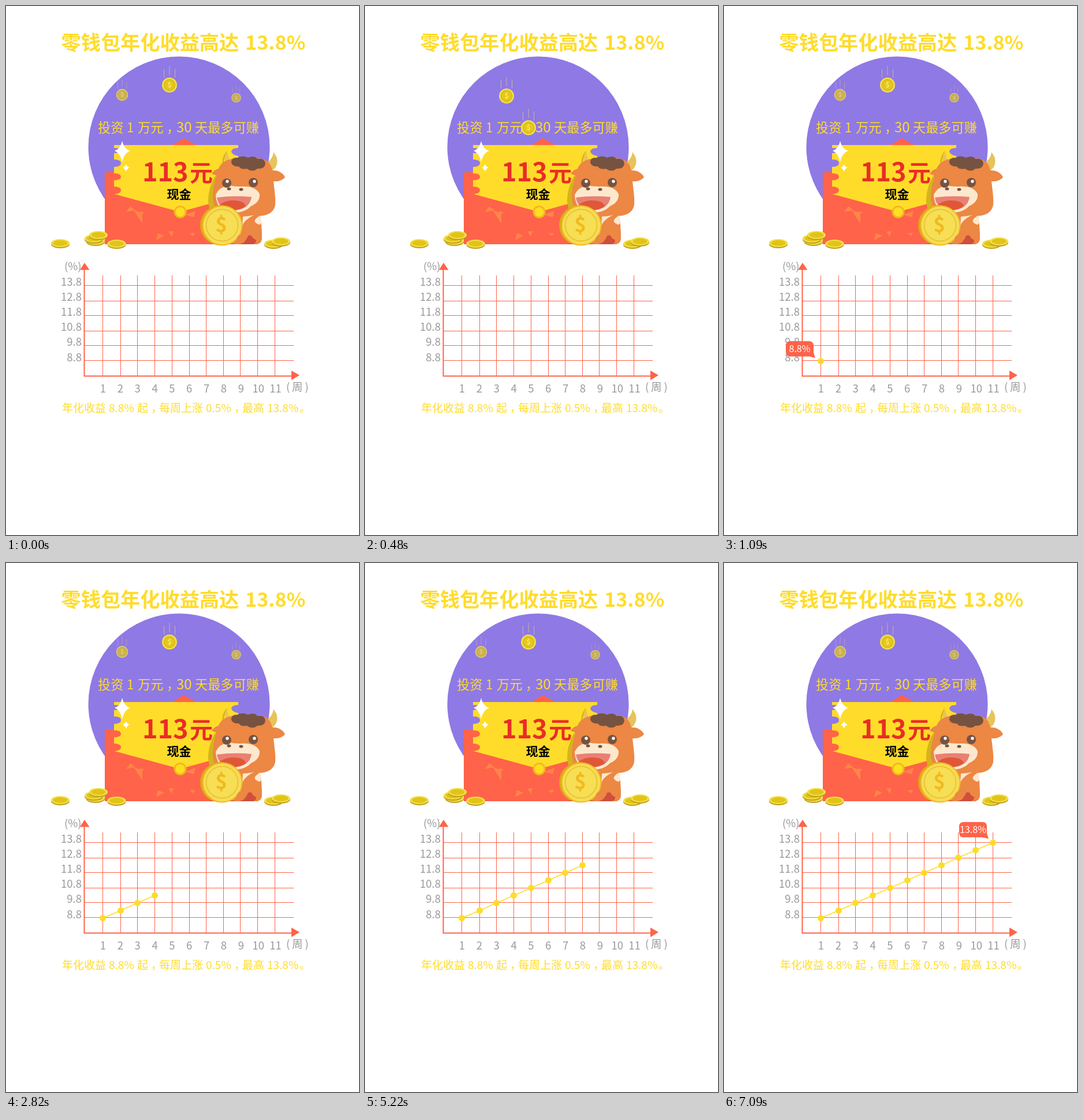
Write an HTML page that moves like this. It is 611x917 px and loops after 7.56 s.

```html
<!DOCTYPE html>
<html lang="zh-CN">
<head>
<meta charset="utf-8">
<title>年化收益</title>
<style>
  html, body { margin: 0; width: 100%; height: 100%; overflow: hidden; background: #fff; }
  svg { display: block; width: 611px; height: 917px; }
  text { font-family: "Noto Sans CJK SC", "Noto Sans CJK", "Open Sans", sans-serif; white-space: pre; }
  .bold { font-weight: 700; }
  .gold { fill: #ffdc2a; }
  .red { fill: #ff6349; }
  .grid { stroke: #ff6349; fill: none; }
  .label { fill: #999; font-size: 18.5px; }
  .mid { text-anchor: middle; }
  .end { text-anchor: end; }
  .tip { fill: #fff; font-size: 16px; text-anchor: middle; }
</style>
</head>
<body>
<svg viewBox="0 0 611 917" xmlns="http://www.w3.org/2000/svg">
  <defs>
    <g id="coin">
      <circle r="13" fill="#f1e04a"/>
      <circle r="10.4" fill="#dcba16"/>
      <circle r="8.6" fill="#e5c71d"/>
      <text class="mid bold" y="4.3" font-size="12" fill="#f7ec70">$</text>
      <path d="M-9.5-28V-13M0-33V-17M9.5-28V-13" stroke="#d9c98c" stroke-opacity=".75" fill="none"/>
    </g>
    <g id="flat">
      <ellipse cy="2" rx="16" ry="7" fill="#c19d16"/>
      <ellipse rx="16" ry="7" fill="#f2df4c"/>
      <ellipse rx="12.5" ry="5" fill="#e2c417"/>
    </g>
  </defs>

  <g class="gold bold">
    <text x="95.5" y="76" font-size="34.2">零钱包年化收益高达</text>
    <text x="414" y="76" font-size="34.2">13.8%</text>
  </g>

  <circle cx="299.5" cy="244.5" r="157" fill="#8f79e5"/>

  <!-- envelope -->
  <path class="red" d="M286 242L308 229L331 242ZM171 291Q171 288 174 288H436V413H171Z"/>
  <path fill="#ffdc2a" d="M187 241H402V246Q391 246 390 252Q391 258 402 260V340H370L301 357L187 326
    Q199 326 199 319.5Q199 313 187 313V302Q199 302 199 296Q199 290 187 290V279
    Q199 279 199 272.5Q199 266 187 266V255Q199 255 199 249Q199 246 187 246Z"/>
  <path class="red" d="M187 326L301 357L370 338V413H187Z"/>
  <path fill="#ff8549" d="M208 357L215 347L224 354ZM221 354L236 359V377ZM232 356L241 358L233 361Z
    M260 406L263 394L274 398ZM281 391L290 390L287 400ZM310 362L328 355L325 366ZM317 394L327 393L324 399Z"/>
  <circle cx="301.5" cy="357" r="11" fill="#f2b91d"/>
  <circle cx="301.5" cy="357" r="8" fill="#fbdf20"/>
  <path fill="#fff" d="M201 234Q204 248 215 251Q204 255 201 271Q198 255 188 251Q198 248 201 234Z
    M208 274Q209 279 214 280Q209 282 208 287Q206 282 202 280Q206 279 208 274Z"/>

  <g class="bold">
    <text x="236" y="304" font-size="45" fill="#e92d26">113</text>
    <text x="318" y="304" font-size="40" fill="#e92d26">元</text>
    <text x="278.5" y="333.5" font-size="21" fill="#000">现金</text>
  </g>

  <!-- calf -->
  <g>
    <path fill="#d5b41c" d="M382 251Q372 264 375 278L360 298Q349 320 350 340L354 360L374 350V280Z"/>
    <path fill="#e8c35b" d="M383 251Q376 266 380 281L392 276Q384 265 383 251ZM463 253Q462 266 449 273L457 288Q474 278 468 261Z"/>
    <path fill="#ec8744" d="M368 282C373 268 388 264 404 264H440C455 267 459 276 461 285
      C472 284 481 291 483 297Q476 305 463 304C465 322 467 334 466 345C463 360 450 363 440 364
      Q443 380 443 404Q442 413 432 413H388L362 350Q357 340 358 327Q359 310 365 294L356 291Q360 284 368 282Z"/>
    <path fill="#765340" d="M390 272Q389 262 401 263Q410 258 419 263Q430 258 435 265Q448 263 449 273
      Q448 283 435 282Q427 289 417 282Q406 284 403 278Q393 279 390 272Z"/>
    <path fill="#fde8cd" d="M363 327Q369 314 385 311Q395 313 405 313Q432 311 439 326Q440 340 424 347
      Q412 360 387 358Q364 354 363 327Z"/>
    <path fill="#e98074" d="M365 332Q394 328 425 331Q422 353 393 354Q368 353 365 332Z"/>
    <path fill="#e05737" d="M370 344Q386 333 407 339Q414 342 415 347Q406 354 393 354Q377 353 370 344Z"/>
    <g fill="#765340">
      <circle cx="382" cy="307" r="8"/><circle cx="428" cy="306" r="8"/>
      <ellipse cx="386" cy="317" rx="3.5" ry="2.5"/><ellipse cx="407" cy="318" rx="3.5" ry="2.5"/>
    </g>
    <g fill="#fff"><circle cx="383" cy="304" r="2.7"/><circle cx="430" cy="304" r="2.7"/></g>
    <path fill="#fde8cd" d="M440 363Q425 372 434 377Q441 382 442 374ZM410 365Q424 364 430 362Q410 372 409 383Z"/>
    <path fill="#cf4e3c" d="M404 413Q415 411 418 399Q425 395 427 402L433 406Q433 413 426 413Z"/>
    <path fill="#cf4e3c" d="M350 413Q375 407 398 413Z"/>
    <circle cx="371" cy="380" r="35" fill="#dda918"/>
    <circle cx="374.5" cy="380.5" r="35" fill="#f1ba20"/>
    <circle cx="374.5" cy="380.5" r="33" fill="#f5dd56"/>
    <circle cx="374" cy="380" r="27.5" fill="#f6de55" stroke="#edbb2a" stroke-width="1.5"/>
    <text class="mid bold" x="372.5" y="392" font-size="35" fill="#f2b91d">$</text>
    <path fill="#ec8744" d="M402 398Q414 391 419 397Q418 407 403 409Q395 406 402 398Z"/>
  </g>

  <use href="#flat" x="94" y="411"/>
  <use href="#flat" x="155" y="407"/>
  <use href="#flat" x="152" y="403"/>
  <use href="#flat" x="160" y="397"/>
  <use href="#flat" x="191.5" y="412"/>
  <use href="#flat" x="463" y="412"/>
  <use href="#flat" x="476" y="408"/>

  <g class="gold" font-size="22.2">
    <text x="159" y="219">投资</text>
    <text x="209" y="219">1</text>
    <text x="228" y="219">万元</text>
    <text x="278" y="219">，</text>
    <text x="295" y="219" font-size="24">30</text>
    <text x="327" y="219">天最多可赚</text>
  </g>

  <g id="coins"></g>
  <g id="chart"></g>

  <g class="gold" font-size="19">
    <text x="97" y="704">年化收益</text>
    <text x="178" y="704">8.8%</text>
    <text x="227" y="704">起</text>
    <text x="251" y="704">，</text>
    <text x="265" y="704">每周上涨</text>
    <text x="346" y="704">0.5%</text>
    <text x="395" y="704">，</text>
    <text x="409" y="704">最高</text>
    <text x="452" y="704">13.8%</text>
    <text x="508" y="704">。</text>
  </g>
</svg>
<script>
const LOOP = 7560, STEP = 30, FIRST = 1020, WEEK = 600;
const gridX = [167, 198, 227, 257, 287, 317, 346, 376, 405, 435, 465];
const gridY = [484, 511, 536, 563, 588, 614];
const tipLeft = [107, 140, 171, 200, 228, 258, 287, 319, 347, 375, 407];
const tipTop = [581, 567, 555, 541, 528, 517, 502, 490, 475, 463, 449];

function add(parent, tag, attrs, text) {
  const el = document.createElementNS('http://www.w3.org/2000/svg', tag);
  for (const key in attrs) el.setAttribute(key, attrs[key]);
  if (text) el.textContent = text;
  return parent.appendChild(el);
}

const chart = document.getElementById('chart');
const dotX = k => gridX[k] + 0.5;
const dotY = k => 615.5 - 13.08 * k;

// Axes, grid and labels
let lines = '';
gridY.forEach((y, i) => {
  lines += `M136 ${y + 0.5}H498`;
  add(chart, 'text', { class: 'label end', x: 131, y: Math.round(485 + 26.1 * i) }, (13.8 - i).toFixed(1));
});
gridX.forEach((x, k) => {
  lines += `M${x + 0.5} 467V641`;
  add(chart, 'text', { class: 'label mid', x: 168 + 29.85 * k, y: 670 }, String(k + 1));
});
add(chart, 'path', { class: 'grid', d: lines });
add(chart, 'path', { class: 'grid', 'stroke-width': 2, d: 'M135.5 450V641.5H498' });
add(chart, 'path', { class: 'red', d: 'M128 457.5L136 445L144.5 457.5ZM494 632L508 640L494 648.5Z' });
add(chart, 'text', { class: 'label', x: 101, y: 458 }, '(%)');
add(chart, 'text', { class: 'label', x: 485, y: 667 }, '(');
add(chart, 'text', { class: 'label', x: 495, y: 667 }, '周');
add(chart, 'text', { class: 'label', x: 517.5, y: 667 }, ')');

const weeks = gridX.map((_, k) => {
  const dot = add(chart, 'g', {});
  if (k) {
    add(dot, 'path', {
      d: `M${dotX(k - 1)} ${dotY(k - 1)}L${dotX(k)} ${dotY(k)}`,
      stroke: '#ffdc2a', 'stroke-width': 1.6
    });
  }
  add(dot, 'circle', { class: 'gold', cx: dotX(k), cy: dotY(k), r: 5.5 });
  const tip = add(chart, 'g', { transform: `translate(${tipLeft[k]} ${tipTop[k]})` });
  add(tip, 'path', {
    class: 'red',
    d: 'M8 0H40Q48 0 48 8V20L51 29L41 26.5H8Q0 26.5 0 18.5V8Q0 0 8 0Z'
  });
  add(tip, 'text', { class: 'tip', x: 24, y: 19 }, (8.8 + k / 2).toFixed(1) + '%');
  return { dot, tip };
});

// Falling coins
const layer = document.getElementById('coins');
const [leftCoin, mainCoin, rightCoin, nextCoin] =
  [0, 1, 2, 3].map(() => add(layer, 'use', { href: '#coin' }));
const clamp = v => Math.max(0, Math.min(1, v));

function place(coin, x, y, size, alpha) {
  coin.setAttribute('transform', `translate(${x} ${y}) scale(${size})`);
  coin.setAttribute('opacity', alpha);
}

function drawCoins(t) {
  const rest = t < STEP || t >= FIRST;
  const q = Math.floor(t / STEP) * STEP;
  const run = rest ? 0 : q - STEP;
  const fade = 1 - clamp(run / 390);
  place(leftCoin, 201, 154 + 0.16 * run, 0.8, 0.75 * fade);
  place(rightCoin, 398.5, 159 + 0.16 * run, 0.64, 0.7 * fade);
  place(mainCoin, 283, 137 + 74 * Math.pow(run / 450, 1.22), 1, 1 - clamp((run - 660) / 120));
  place(nextCoin, 245, 116 + (q - 240) / 6, 1,
    rest ? 0 : clamp((q - 210) / 90) * clamp((FIRST - q) / 120));
}

function show(el, on) {
  el.style.display = on ? '' : 'none';
}

function frame() {
  const t = performance.now() % LOOP;
  drawCoins(t);
  weeks.forEach(({ dot, tip }, k) => {
    const age = t - FIRST - WEEK * k;
    show(dot, age >= 0);
    show(tip, age >= 70 && age < WEEK);
  });
  requestAnimationFrame(frame);
}
frame();
</script>
</body>
</html>
```
